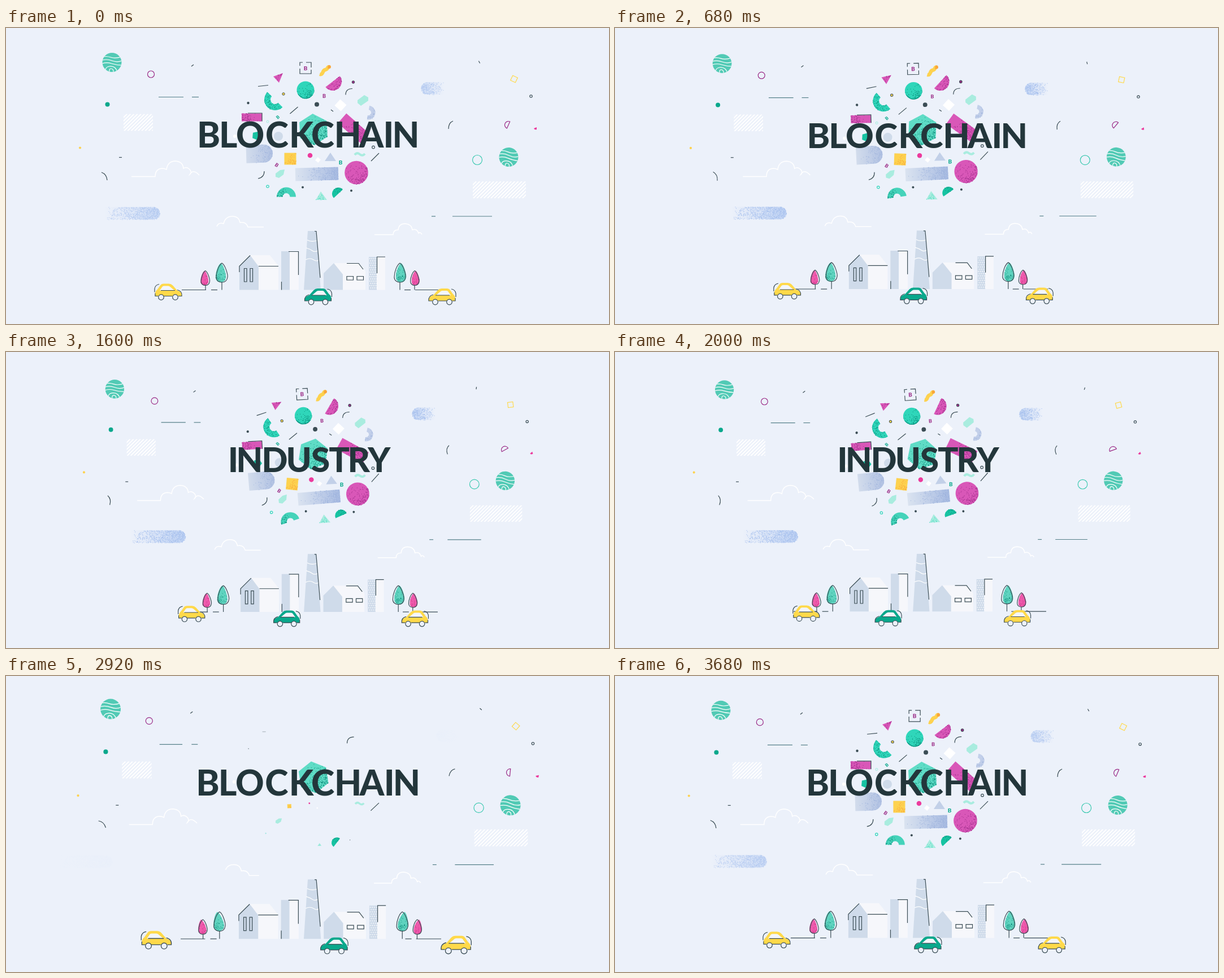
Recreate the animation shown at these times as an HTML page with a canvas. Size 1067x525 px, loop 3.72 s.

```html
<!DOCTYPE html>
<html lang="en">
<head>
<meta charset="utf-8">
<title>Blockchain industry</title>
<style>
html, body { margin: 0; width: 100%; height: 100%; overflow: hidden; background: #ecf1fa; }
canvas { display: block; }
</style>
</head>
<body>
<canvas id="stage" width="1067" height="525"></canvas>
<script>
const g = document.getElementById('stage').getContext('2d');
const LOOP = 3720, STEP = 40, CUT = 2200;
const BG = '#ecf1fa', INK = '#23363b', LINE = '#3b4d55', TEAL = '#2fd6ba', DEEP = '#0a8a78',
  GREEN = '#0aa88c', MINT = '#a9ecdf', PINK = '#d957b8', PLUM = '#9a2a86', HOT = '#ec3a9d',
  SUN = '#ffd94a', ORANGE = '#f9a63a', BLUE = '#cfdbea', SKY = '#a3b7de', PALE = '#f6f7fb', WHITE = '#fff';

let seed = 11;
const rnd = () => (seed = (seed * 16807) % 2147483647) / 2147483647;
const clamp = p => Math.max(0, Math.min(1, p));
const back = p => { p = clamp(p) - 1; return 1 + 2.7 * p ** 3 + 1.7 * p * p; };
const out = p => 1 - (1 - clamp(p)) ** 3;
function along(t, keys) {
  let i = 1;
  while (i < keys.length - 1 && t > keys[i][0]) i++;
  const [a, x] = keys[i - 1], [b, y] = keys[i];
  return x + (y - x) * (t - a) / (b - a);
}

// Path builders, centred on the origin
const disc = r => `M${-r} 0a${r} ${r} 0 1 0 ${2 * r} 0a${r} ${r} 0 1 0 ${-2 * r} 0z`;
const half = r => `M${-r} 0a${r} ${r} 0 0 1 ${2 * r} 0z`;
const arch = (R, r) => `M${-R} 0A${R} ${R} 0 0 1 ${R} 0H${r}A${r} ${r} 0 0 0 ${-r} 0z`;
const box = (w, h) => `M${-w / 2} ${-h / 2}h${w}v${h}h${-w}z`;
const ngon = (n, r) => 'M' + Array.from({ length: n }, (_, i) => {
  const a = i * 2 * Math.PI / n;
  return `${r * Math.sin(a)} ${-r * Math.cos(a)}`;
}).join('L') + 'z';
function grad(x0, x1, c0, c1) {
  const f = g.createLinearGradient(x0, 0, x1, 0);
  f.addColorStop(0, c0);
  f.addColorStop(1, c1);
  return f;
}

// Speckles that get denser towards the given direction
function speckle(path, r, dir, amount = .6) {
  const dots = new Path2D(), n = r * r * 2.4;
  for (let i = 0; i < n; i++) {
    const x = (rnd() * 2 - 1) * r, y = (rnd() * 2 - 1) * r;
    const q = clamp(((x * Math.cos(dir) + y * Math.sin(dir)) / r + 1) / 2);
    if (rnd() < q * q * amount && g.isPointInPath(path, x, y)) dots.rect(x - .5, y - .5, 1, 1);
  }
  return dots;
}
function shape(d, color, grain, r, dir, amount) {
  const path = new Path2D(d), dots = grain && speckle(path, r, dir, amount);
  return () => {
    g.fillStyle = color;
    g.fill(path);
    if (dots) { g.fillStyle = grain; g.fill(dots); }
  };
}
function stroke(d, color = LINE, w = 1.2) {
  const path = new Path2D(d);
  return () => { g.strokeStyle = color; g.lineWidth = w; g.stroke(path); };
}
const both = (...fns) => t => fns.forEach(f => f(t));
const letter = (color, size) => () => {
  g.font = `800 ${size}px Lato, sans-serif`;
  g.fillStyle = color;
  g.textAlign = 'center';
  g.fillText('B', 0, size * .36);
};

const cluster = [], sky = [], street = [];
const adder = (list, start) => (x, y, fn, o = {}) =>
  list.push({ x, y, fn, a: 0, spin: 0, dx: 0, dy: 0, at: start(), ...o });
const near = adder(cluster, () => -.8 + rnd() * .4);
const far = adder(sky, () => -1.2);
const road = adder(street, () => -1.48);
const EARLY = -1.19, SOON = -.83;

// Shapes behind the title
near(530, 71, both(stroke('M-10-4V-10H-5M1-10H10V-1M10 3V10H-10V1'), letter(PLUM, 10)));
near(564, 76, both(stroke('M-9 6C-2 8-5-1 1-2S3-8 9-7', '#fdd24f', 6.5), shape('M6-10h2a3 3 0 0 1 0 6h-3z', ORANGE)));
near(482, 88, shape('M8-8L-9-2L1 9z', PINK, PLUM, 10, -.8), { spin: .2 });
near(455, 102.5, stroke('M-9 1L9-1'), { spin: -.1, at: SOON });
near(530, 110, both(shape(disc(15.5), TEAL, DEEP, 16, 1.1), stroke('M-13 7A15 15 0 0 0 10 11', DEEP, 1)));
near(578, 95, shape(half(16), PINK, PLUM, 16, -2.2), { a: 2.48, spin: -.2 });
near(614.5, 96, both(shape(disc(2.3), PLUM), stroke(disc(2.3), LINE, 1)));
near(607, 112.5, stroke('M-6 6Q-6-5 6-5'), { at: EARLY, spin: .05 });
near(563, 121, letter(PLUM, 9));
near(491, 117, both(shape(disc(2.2), SUN), stroke(disc(2.2), LINE, 1)));
near(476, 127, shape(arch(19, 8), TEAL, DEEP, 20, -1.5), { a: -2.36, spin: .16 });
near(428.5, 133, shape(disc(2.2), LINE), { at: SOON });
near(550, 135.5, shape(disc(4), LINE));
near(509.5, 146, stroke('M-7 6L7-6'), { spin: .05 });
near(592, 137, shape(box(15, 15), WHITE), { a: .73, spin: .05 });
near(631, 129, shape('M-9 4V-1L3-10L10-6V0L-3 9z', MINT));
near(641, 150, shape(arch(12.5, 5), '#c3d0ea', SKY, 13, -1.2), { a: 1.75, spin: .05 });
near(577, 146.5, stroke('M-2-1.5L2 1.5'));
near(435, 158.5, both(shape(box(36, 14), PINK, PLUM, 18, 3), stroke('M-7-7.5H18V7')));
near(481, 158, letter(GREEN, 8), { a: -.7 });
near(463, 166, stroke(disc(2), MINT, 1));
near(544, 180, shape(ngon(6, 28), '#5fdcc6', DEEP, 28, .9), { a: -.05, spin: .16, at: EARLY });
near(615, 178, shape(box(54, 23), PINK, PLUM, 27, .3), { a: .72, spin: -.1 });
near(405, 192, shape(disc(3), WHITE), { at: EARLY });
near(443, 191, shape(ngon(5, 8), '#17c3a2'), { a: .4 });
near(482, 192, shape(disc(8), BLUE));
near(448, 223, shape('M-23-16H8A16 16 0 0 1 8 16H-23z', grad(-23, 23, '#d2dcec', '#b3c3e3'), SKY, 24, 0), { a: -.03 });
near(503, 232, shape(box(21, 21), '#fdd24f', ORANGE, 11, .7), { spin: .09, at: SOON });
near(538, 226, shape(disc(4.3), HOT), { at: SOON });
near(552, 234, shape(box(7, 7), WHITE), { a: .7, at: SOON });
near(574, 229, shape('M-10 7H10L0-8z', '#c2d0e8'));
near(626, 224, stroke('M-9 1Q-5-4 0 0T9-1', MINT, 4), { at: -.9 });
near(650, 211.5, stroke(disc(2.3)));
near(653, 229, stroke('M-7 7L7-7'), { at: EARLY });
near(592, 238, letter(GREEN, 10), { spin: .04 });
near(479, 243, letter(PLUM, 9), { a: .6 });
near(485, 259, shape('M-8 5V-1L0-7L8-8L6 1L-2 7z', MINT), { at: -.87, spin: -.05 });
near(451, 261, stroke('M6-7Q6 4-5 6'), { spin: -.05 });
near(550, 259, shape(box(76, 23), grad(-38, 38, '#dae3f0', '#a9bce2'), '#9bb1dc', 38, 0), { a: -.025 });
near(620, 256.5, shape(disc(20.8), PINK, PLUM, 21, .9));
near(463, 281, stroke(disc(2.2), TEAL), { at: SOON });
near(525, 282.5, shape(disc(2), LINE));
near(611, 288.5, shape(disc(2), LINE), { at: SOON });
near(496, 299.5, shape(arch(17, 6.5), '#45d3ba', DEEP, 17, 2.6), { spin: -.17 });
near(558, 298, shape('M-10 7H10L-1-8z', MINT, TEAL, 10, 2.2), { at: SOON });
near(588, 294, shape(half(11), '#17c3a2', DEEP, 11, 0), { a: -.75, spin: .24, at: -.9 });

// Floating pieces around the scene
const ball = new Path2D(disc(17));
const waves = stroke('M-20-9Q-10-12-2-9T20-11M-20-3Q-10-7 0-3T20-4M-20 3Q-10-1-1 2T20 5M-11 20Q-14 8-4 7Q8 6 10 20M-4 20Q-6 11-2 11Q4 11 2 20', WHITE, 1.2);
const globe = () => {
  g.fillStyle = '#52cab5';
  g.fill(ball);
  g.clip(ball);
  waves();
};
const hatch = (w, h) => {
  let d = '';
  for (let x = -w / 2 - h; x < w / 2; x += 6.2) d += `M${x} ${h / 2}l${h} ${-h}`;
  const lines = stroke(d, WHITE, 1.9);
  return t => {
    const k = out((t + 1.4) / .68);
    g.beginPath();
    g.rect(-w / 2 * k, -h / 2, w * k, h);
    g.clip();
    lines();
  };
};
// Clouds are traced from the middle of their outline
const cloud = (d, length, at) => {
  const path = new Path2D(d);
  return t => {
    const k = out((t - at) / .6);
    if (!k) return;
    g.strokeStyle = WHITE;
    g.lineWidth = 1.5;
    if (k < 1) {
      g.setLineDash([length * k, 400]);
      g.lineDashOffset = -length * (1 - k) / 2;
    }
    g.stroke(path);
  };
};
const whole = { at: -1.55 };
far(187.5, 61, globe, { at: -1.1, dx: -.7, dy: .8 });
far(889.5, 229, globe, { at: -1.1, dy: -.8, a: .1 });
far(256.5, 82, stroke(disc(6), PLUM), { at: -1.29, dx: 1, dy: 1 });
far(330, 66.5, stroke('M-2 1.5L2-1.5'), { at: -1.19 });
far(179.5, 135.5, shape(disc(4), GREEN), { at: -1.15 });
far(131, 212.5, shape(disc(2.1), '#fdd24f'), { at: -1.5 });
far(202.5, 229.5, stroke('M-2.5 0H2.5'), { dx: 3.5 });
far(174, 263, stroke('M-5-7Q4-4 5 7'), { spin: .25, dx: 1, at: -1.15 });
far(234, 167.5, hatch(52, 30), whole);
far(873, 287, hatch(94, 30), whole);
far(837.5, 60.5, stroke('M-1-2L1 2'), { a: -.05, spin: .4, at: -1.4 });
far(899, 90.5, stroke(box(9.5, 9.5), SUN), { a: .44, spin: -.35, at: -1.5 });
far(929, 121, stroke(disc(2.2)), { at: -1.5 });
far(787, 172, stroke('M4-7Q-4-4-4 7'), { spin: -.22 });
far(889, 172, stroke(half(6.5), PLUM), { a: -1.15, spin: .4, at: -1.5 });
far(936, 178, shape('M-2 0L3-2V2Q-1 3-2 0z', HOT), { at: -1.1, spin: -.2 });
far(834, 234, stroke(disc(8.5), '#3cc9b0'), { at: -1.15 });
far(0, 0, cloud('M222 263.5H264Q264 250 276 249Q281 249 284 251Q286 236 300 236Q313 237 314 249Q320 245 326 252Q329 257 325 260Q331 249 342 261', 175, -1.27), { ...whole, dx: 3 });
far(0, 0, cloud('M373 352Q376 344 385 347Q388 334 401 334Q412 334 414 345Q425 343 428 353H456', 110, -.98), { ...whole, dx: -4.2 });
far(0, 0, cloud('M652 366.5H685Q685 358 694 358Q695 347 706 347Q718 348 719 358Q727 355 730 364Q733 361 736 366', 110, -1.2), { ...whole, dx: 5 });
// Bars grow outwards from their inner end
function bar(x1, x2, y, at, shrink = 0, dx = 0) {
  const left = x1 < 534, size = x2 - x1;
  far(left ? x2 : x1, y, t => {
    const len = size * out((t - at) / .76) - shrink * Math.max(0, t);
    stroke(`M0 0H${left ? -len : len}`, '#568089', 1.2)();
  }, { ...whole, dx });
}
bar(270, 314, 122.5, -1.22);
bar(329, 341, 122.5, -1.22);
bar(753, 760, 334, -1.33);
bar(790, 860, 334, -1.33, 6, -2.7);

// Speckled streaks
const capsule = (w, h) => `M${-w} ${-h}H${-h}A${h} ${h} 0 0 1 ${-h} ${h}H${-w}z`;
const streak = w => {
  const path = new Path2D(capsule(w, 11));
  const dots = new Path2D();
  for (let i = 0; i < w * 26; i++) {
    const x = -rnd() * w, y = rnd() * 22 - 11, q = 1 + x / w;
    if (rnd() < q * .55 && g.isPointInPath(path, x, y)) dots.rect(x, y, 1.1, 1.1);
  }
  const fill = grad(-w, 0, 'rgba(190,208,242,0)', 'rgba(180,203,242,.75)');
  return (x, y, flip, alpha) => {
    g.save();
    g.translate(x, y);
    g.scale(flip, 1);
    g.globalAlpha = alpha;
    g.fillStyle = fill;
    g.fill(path);
    g.fillStyle = '#a9c2ee';
    g.fill(dots);
    g.restore();
  };
};
const longStreak = streak(98), shortStreak = streak(40);
function streaks(t) {
  const a = clamp((t + .83) / 1.1);
  longStreak(along(t, [[-.8, 188], [0, 272], [.68, 303], [1.24, 312], [2, 323]]), 328.5 - .8 * t, 1, a);
  shortStreak(along(t, [[-.8, 762], [0, 735], [.68, 726], [1.24, 722], [2, 716]]), 107 + 1.6 * t, -1, a);
}

// Town
const wall = d => shape(d, BLUE), light = d => shape(d, PALE);
let specks = '';
for (let j = 0; j < 14; j++)
  for (let i = 0; i < 4; i++) specks += `M${643 + i * 3.6 + j % 2 * 1.6} ${409 + j * 4}h1.5`;
const town = both(
  light('M432 403H467L482 422V464.5H447z'),
  wall('M413 464.5V423L432 403L447 423V464.5z'),
  stroke('M413 433V422.5L432 403.5M447 422.5H482M421.5 426.5H426V450H421.5zM432 426.5H436.5V450H432z'),
  wall('M487 396H502V464.5H487z'), light('M502 396H518V464.5H502z'),
  stroke('M500 396.5H517.5V438M487.5 450V464.5'),
  wall('M534 360H549L557 464.5H527z'),
  stroke('M533 376Q540 380 550 377M531 390Q538 392 542 395T552 395M530 411Q538 407 544 411T554 411', WHITE, 1.2),
  stroke('M546 360.5H549L556 443'),
  light('M580 417H624L636 431V464.5H580z'),
  wall('M562 464.5V435L580 417L596 437V464.5z'),
  stroke('M603 417.5H624L632 428M603 440.5H614.5V447H603zM621 440.5H632.5V447H621z'),
  wall('M642 406H656V464.5H642z'), light('M656 406H671V464.5H656z'),
  stroke(specks, WHITE, 1.3),
  stroke('M656.5 435V406H671')
);
const rise = t => {
  g.save();
  g.translate(0, 464.5);
  g.scale(1, out((t + 1.52) / .3));
  g.translate(0, -464.5);
  town();
  g.restore();
};

const EGG = 'M0-17C6-14 11 4 10 8C9 15 4 17 0 17C-5 17-10 14-10 8C-10-2-5-14 0-17z';
function tree(x, h, size, color, grain, side) {
  const leaf = shape(EGG, color, grain, 17, 2, .4), rim = stroke(EGG, LINE, 1.2 / size);
  road(x, 464.5, t => {
    const sway = clamp(-t);
    g.translate(-3.5 * side * sway, 0);
    stroke(`M${side} ${-h + 12 * size}V0`)();
    g.translate(0, -h);
    g.scale(size, size);
    g.save();
    g.translate(-side, 0);
    g.rotate(-.15 * side * sway);
    g.scale(.92, 1);
    leaf();
    g.restore();
    g.translate(side, 0);
    rim();
  });
}
tree(381, 30.5, 1, '#5fd3bf', DEEP, 1);
tree(352, 21, .76, '#ee5aac', '#b81c72', 1);
tree(698, 30.5, 1, '#5fd3bf', DEEP, -1);
tree(724, 21, .76, '#ee5aac', '#b81c72', -1);
for (const [a, b] of [[311, 354], [363, 374], [705, 716], [724, 768]])
  road((a + b) / 2, 464.5, t => {
    const h = (b - a) / 2 * out((t + 1.5) / .75);
    stroke(`M${-h} 0H${h}`)();
  }, whole);

function car(x, y, flip, color, dx, at) {
  const body = shape('M-23-7V-13Q-22-17-19-19L-14-26Q-12-29-8-29H1Q5-29 8-26L16-17Q24-15 24-9V-7z', color);
  const glass = shape('M-15-17L-10-24Q-9-25-7-25H0Q2-25 4-23L11-17z', '#f3f6fc');
  const trim = stroke('M-24-14V-20Q-23-27-16-28M-13-17H12M16-18Q25-16 24-7H18M-23-12V-7H-18M-8-7H7');
  const tyres = both(shape(disc(4.8), BG), stroke(disc(4.8)));
  road(x, y, () => {
    g.scale(flip, 1);
    body();
    glass();
    trim();
    g.translate(-12.5, -5);
    tyres();
    g.translate(25, 0);
    tyres();
  }, { dx, at });
}
car(287, 482.5, 1, SUN, 23.5, -1.02);
car(552.5, 491, -1, GREEN, -35, -1.23);
car(772, 491, -1, SUN, -28, -1.02);

// Titles: each letter flies in from its own side
const word = (text, xs, at, until, from) => ({ text, xs, at, until, from });
const words = [
  word('BLOCKCHAIN', [359.5, 395, 432.5, 480.5, 525, 561.5, 604.7, 646.7, 677, 707.5], -1.52, .94, { 3: [0, 193], 6: [0, 106], 7: [0, -110], 9: [73, 0] }),
  word('INDUSTRY', [399.7, 429, 475.7, 518.3, 556.8, 590.3, 628.3, 662.7], .94, 9, {})
];
function title(t) {
  const w = words.find(w => t < w.until);
  g.font = '800 62px Lato, "Open Sans", sans-serif';
  g.fillStyle = INK;
  g.textAlign = 'left';
  [...w.text].forEach((c, i) => {
    const late = w.from[i], m = g.measureText(c);
    const k = (1 - clamp((t - w.at) / (late ? .6 : .2))) ** 2;
    const [dx, dy] = late || [0, i % 2 ? 60 : -60];
    const mid = (m.actualBoundingBoxRight - m.actualBoundingBoxLeft) / 2;
    g.fillText(c, w.xs[i] - mid + dx * k, 212.3 + dy * k);
  });
}

function show(list, t) {
  for (const o of list) {
    const k = back((t - o.at) / .38);
    if (k <= 0) continue;
    g.save();
    g.translate(o.x + o.dx * t, o.y + o.dy * t);
    g.rotate(o.a + o.spin * t);
    g.scale(k, k);
    o.fn(t);
    g.restore();
  }
}

function render(ms) {
  const t = (ms < CUT ? ms : ms - LOOP) / 1000, zoom = 1 - .0108 * t;
  g.setTransform(1, 0, 0, 1, 0, 0);
  g.fillStyle = BG;
  g.fillRect(0, 0, 1067, 525);
  streaks(t);
  g.translate(534, 264);
  g.scale(zoom, zoom);
  g.translate(-534, -264);
  show(sky, t);
  g.save();
  g.translate(535, 183);
  g.rotate(-.035 * t);
  g.translate(-535, -183);
  show(cluster, t);
  g.restore();
  title(t);
  rise(t);
  show(street, t);
}

const t0 = performance.now();
function tick() {
  const ms = (performance.now() - t0) % LOOP;
  render(Math.floor(ms / STEP) * STEP);
  requestAnimationFrame(tick);
}
tick();
</script>
</body>
</html>
```
